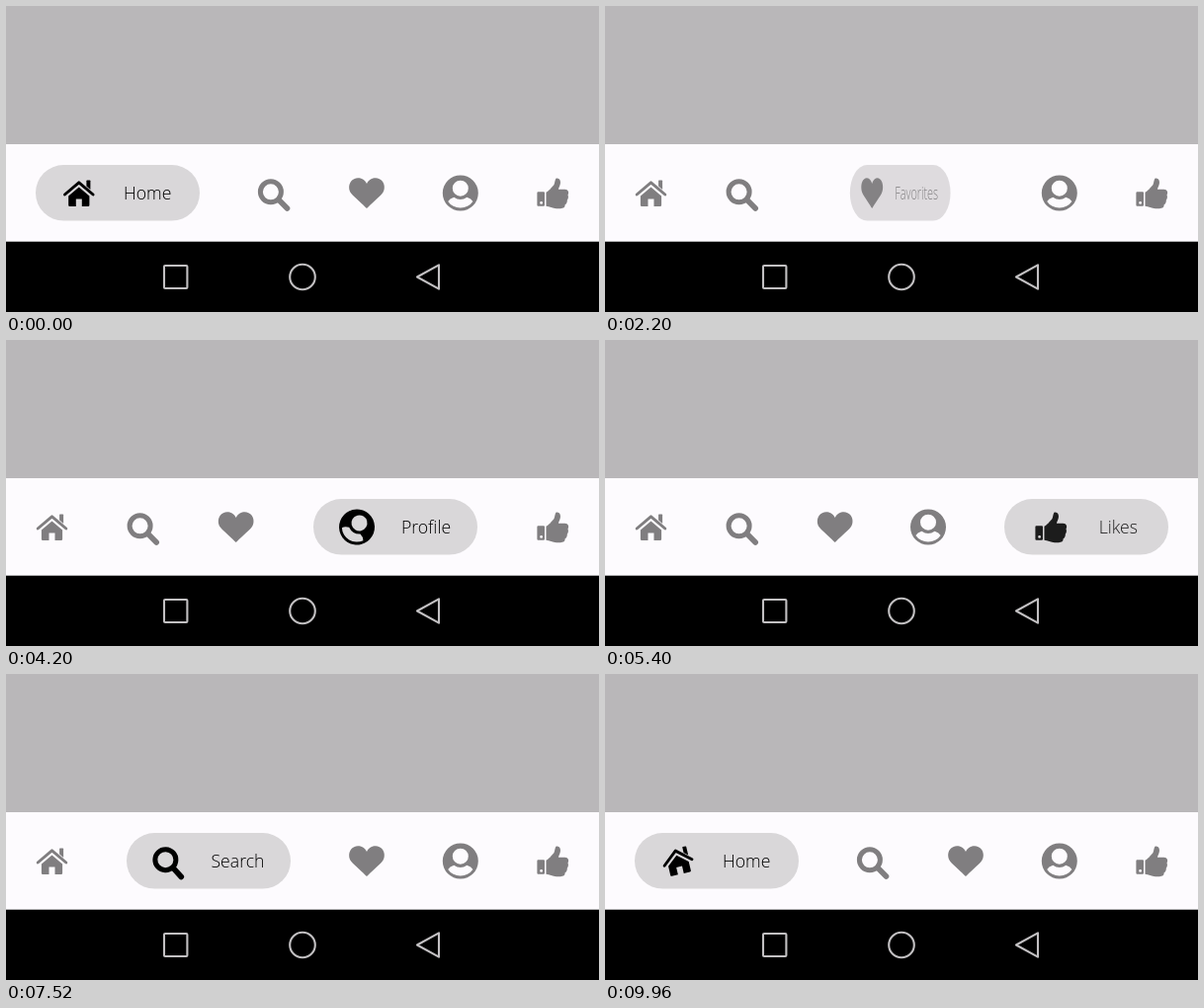
An HTML page for the animation above (10000 ms loop, 600 by 310 pixels).

```html
<!DOCTYPE html>
<html lang="en">
<head>
<meta charset="utf-8">
<title>Expanding tab bar</title>
<style>
  html, body { margin: 0; width: 100%; height: 100%; overflow: hidden; background: #b9b7b9; }
  svg { display: block; width: 100%; height: 100%; }
  text { font: 300 17.7px "Open Sans", "Noto Sans", sans-serif; text-anchor: middle; fill: #000; }
</style>
</head>
<body>
<svg viewBox="0 0 600 310">
  <defs>
    <g id="home">
      <path d="M-14.3 1.2 0-11 14.3 1.2" fill="none" stroke="currentColor" stroke-width="2.9" stroke-linecap="round" stroke-linejoin="round"/>
      <path d="M7.6-12.6q0-.6.6-.6h2.8q.6 0 .6.6v8.8l-4-3.4z"/>
      <path d="M-10.6 2.6 0-6.3 10.6 2.6V12q0 1.2-1.2 1.2H3V5.6H-3v7.6H-9.4q-1.2 0-1.2-1.2z"/>
    </g>
    <g id="search" fill="none" stroke="currentColor" stroke-linecap="round">
      <circle cx="-3.4" cy="-1.9" r="10.5" stroke-width="5"/>
      <path d="M4.8 6.3 13.2 14.8" stroke-width="5.6"/>
    </g>
    <path id="heart" d="M0 15.6C-3 12.6-13 3.8-15.6.6C-18.4-2.6-18.6-8.4-16-11.8C-13.2-15.6-7.8-16.4-4-13.9C-2-12.6-.8-11-0-9.6C.8-11 2-12.6 4-13.9C7.8-16.4 13.2-15.6 16-11.8C18.6-8.4 18.4-2.6 15.6.6C13 3.8 3 12.6 0 15.6Z"/>
    <path id="profile" fill-rule="evenodd" d="M-18 0a18 18 0 1 1 36 0a18 18 0 1 1-36 0Z
      M-8-4.8a8 8 0 1 0 16 0a8 8 0 1 0-16 0Z
      M-12.6 8.4Q-11 5.4-6.6 4.2Q0 8.6 6.6 4.2Q11 5.4 12.6 8.4A15.2 15.2 0 0 1-12.6 8.4Z"/>
    <path id="likes" fill-rule="evenodd" d="M-14.6-1.6h5.6q1 0 1 1V12q0 1-1 1h-5.6q-1 0-1-1V-.6q0-1 1-1Z
      M-12.8 9.6a1.4 1.4 0 1 0 2.8 0a1.4 1.4 0 1 0-2.8 0Z
      M-6.5-1C-4-2-1-6 1-8C2.5-9.5 2.3-15 4-15.2C8-15.5 9-11 7-7C6.4-5.6 6-4.6 6-4H12.5C16-4 17-.5 15.5 1.5C16.5 4 15.6 6 14.8 7C15 9 14 11 12.5 11.8C13 14 11 15.4 8 15.4H4C0 15.4-3 13-6.5 13Z"/>
  </defs>

  <rect width="600" height="310" fill="#b9b7b9"/>
  <rect y="140" width="600" height="99" fill="#fdfbfe"/>
  <rect y="238.7" width="600" height="72" fill="#000"/>
  <g fill="none" stroke="#c2c0c2" stroke-width="2.1" stroke-linejoin="round">
    <rect x="160" y="263" width="23.4" height="23" rx="1"/>
    <circle cx="300" cy="274.5" r="12.8"/>
    <path d="M416 274.5 438 262.3V286.7Z"/>
  </g>
  <g id="bar"></g>
</svg>
<script>
const LOOP = 10000, MID_Y = 189.5, PILL_W = 166;

// before / after: icon centre when the tab lies left / right of the open one
const tabs = [
  { id: 'home',    label: 'Home',      before: 46.5,  after: 46.5,  pill: 30,    icon: 73.8,  text: 143.2, y: 189.8 },
  { id: 'search',  label: 'Search',    before: 139,   after: 271.3, pill: 122,   icon: 164.7, text: 234.5, y: 190.2 },
  { id: 'heart',   label: 'Favorites', before: 232.7, after: 365,   pill: 215.7, icon: 252.2, text: 325.5, y: 189.5 },
  { id: 'profile', label: 'Profile',   before: 327,   after: 459.8, pill: 311,   icon: 355,   text: 425,   y: 189.5 },
  { id: 'likes',   label: 'Likes',     before: 553,   after: 553,   pill: 404,   icon: 451,   text: 519.3, y: 189.8 }
];

// [press time, open time, tab]
const taps = [
  [240, 440, 1], [1920, 1960, 2], [3160, 3360, 3], [4680, 4880, 4],
  [6520, 6520, 1], [7760, 7880, 2], [9120, 9320, 0]
];

// [ms after opening, icon angle]
const wobble = [[0, 0], [560, 0], [720, -26], [850, 32], [1030, 0]];

const clamp = x => Math.max(0, Math.min(1, x));
const smooth = x => { x = clamp(x); return x * x * (3 - 2 * x); };

function angleAt(ms) {
  const i = wobble.findIndex(([time]) => time > ms);
  if (i < 1) return 0;
  const [t0, a0] = wobble[i - 1], [t1, a1] = wobble[i];
  return a0 + (a1 - a0) * smooth((ms - t0) / (t1 - t0));
}

function add(parent, tag, attrs) {
  const node = document.createElementNS('http://www.w3.org/2000/svg', tag);
  set(node, attrs);
  return parent.appendChild(node);
}

function set(node, attrs) {
  for (const key in attrs) node.setAttribute(key, attrs[key]);
}

const bar = document.getElementById('bar');
for (const tab of tabs) {
  tab.small = add(bar, 'use', { href: '#' + tab.id, fill: '#807e80', color: '#807e80' });
  tab.open = add(bar, 'g', {});
  tab.back = add(tab.open, 'rect', { x: tab.pill, y: 161, width: PILL_W, height: 56.6, rx: 28.3, fill: '#d9d7d9' });
  tab.content = add(tab.open, 'g', {});
  tab.big = add(tab.content, 'use', { href: '#' + tab.id, fill: '#000', color: '#000' });
  add(tab.content, 'text', { x: tab.text, y: 196 }).textContent = tab.label;
}

function draw(time) {
  let active = 0, opened = -LOOP, pressed = -1;
  for (const [press, open, tab] of taps) {
    if (time >= open) { active = tab; opened = open; }
    else if (time >= press) pressed = tab;
  }
  const age = time - opened;
  tabs.forEach((tab, i) => {
    const isOpen = i === active;
    tab.small.style.display = isOpen ? 'none' : '';
    tab.open.style.display = isOpen ? '' : 'none';
    if (!isOpen) {
      const x = i < active ? tab.before : tab.after;
      set(tab.small, { transform: `translate(${x} ${tab.y})`, opacity: i === pressed ? 0.2 : 1 });
      return;
    }
    const flip = Math.sin(smooth(age / 540) * Math.PI / 2);
    const middle = tab.pill + PILL_W / 2;
    set(tab.open, { transform: `translate(${middle} 0) scale(${flip} 1) translate(${-middle} 0)` });
    set(tab.back, { opacity: clamp(age / 280) });
    set(tab.content, { opacity: clamp(age / 600) });
    set(tab.big, { transform: `translate(${tab.icon} ${tab.y}) rotate(${angleAt(age)})` });
  });
}

const start = performance.now();
function tick() {
  draw((performance.now() - start) % LOOP);
  requestAnimationFrame(tick);
}
tick();
</script>
</body>
</html>
```
